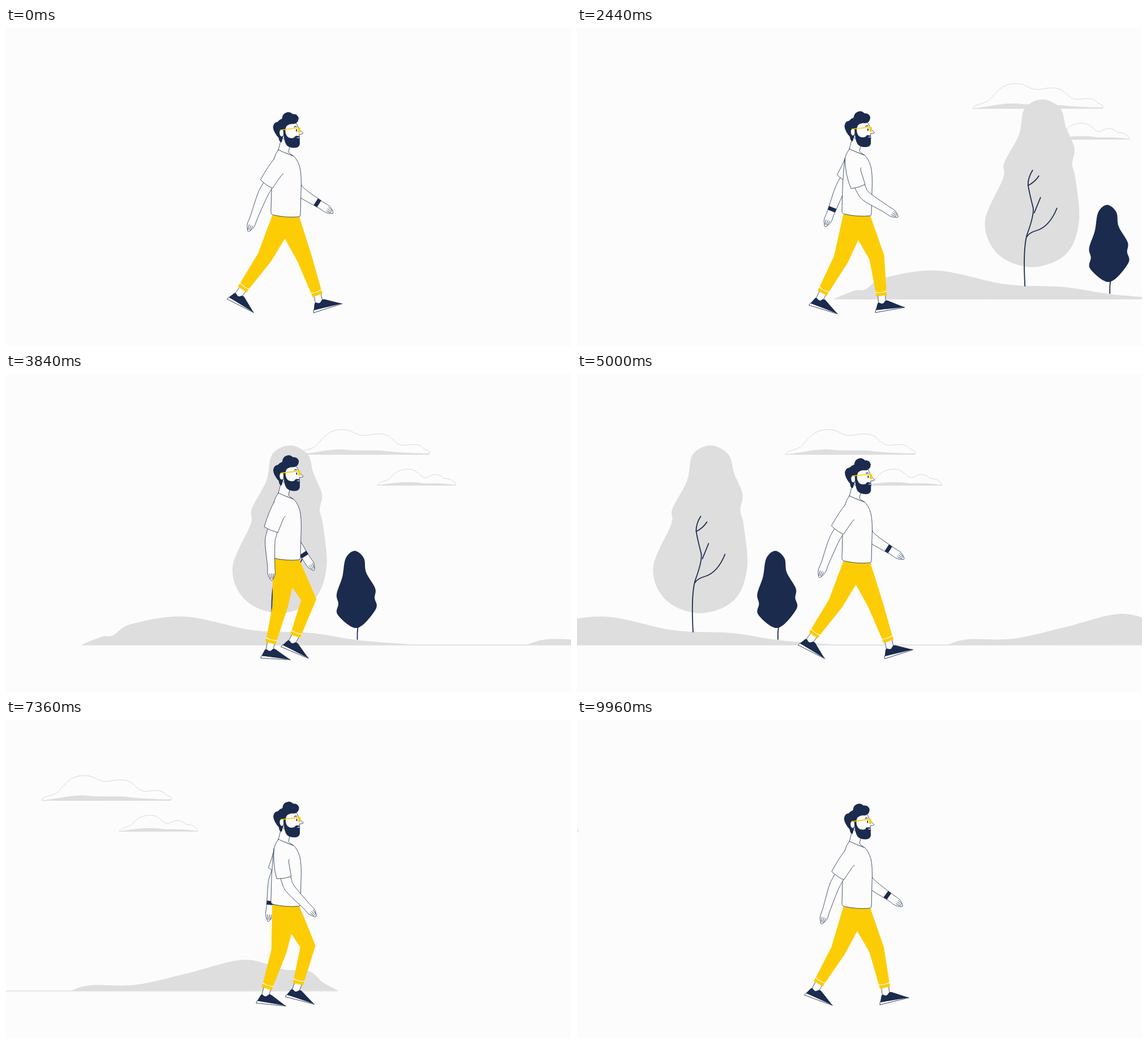
An HTML page with a canvas for the animation above (10 s loop, 998x561 px).

```html
<!DOCTYPE html>
<html lang="en">
<head>
<meta charset="utf-8">
<title>Walking man</title>
<style>
  html, body { margin: 0; width: 100%; height: 100%; overflow: hidden; background: #fcfcfc; }
  canvas { display: block; width: 998px; height: 561px; }
</style>
</head>
<body>
<canvas id="stage" width="998" height="561"></canvas>
<script>
const ctx = document.getElementById('stage').getContext('2d');
const PAPER = '#fcfcfc', NAVY = '#1b2b4d', YELLOW = '#fccc05', GRAY = '#dedede';
const LOOP = 10000, STEP = 40, STRIDE = 1000;
const TAU = Math.PI * 2, rad = d => d * Math.PI / 180;
const wave = u => Math.cos(TAU * u);

// ---- drawing helpers ----
// Cubic through b and c, with a and d as neighbours
const spline = (a, b, c, d, s) =>
  b + 0.5 * s * (c - a + s * (2 * a - 5 * b + 4 * c - d + s * (3 * (b - c) + d - a)));

function paint(path, fill, stroke, width = 0.8) {
  if (fill) { ctx.fillStyle = fill; ctx.fill(path); }
  if (stroke) { ctx.strokeStyle = stroke; ctx.lineWidth = width; ctx.stroke(path); }
}

function poly(...pts) {
  const p = new Path2D();
  pts.forEach(([x, y]) => p.lineTo(x, y));
  p.closePath();
  return p;
}

// Smooth path; a loop also rounds the joint between its ends
function curve(pts, loop = false) {
  const p = new Path2D(), n = pts.length;
  const at = i => loop ? pts[(i + n) % n] : pts[Math.max(0, Math.min(n - 1, i))];
  p.moveTo(...pts[0]);
  for (let i = 0; i < (loop ? n : n - 1); i++) {
    const [a, b, c, d] = [at(i - 1), at(i), at(i + 1), at(i + 2)];
    p.bezierCurveTo(b[0] + (c[0] - a[0]) / 6, b[1] + (c[1] - a[1]) / 6,
      c[0] - (d[0] - b[0]) / 6, c[1] - (d[1] - b[1]) / 6, c[0], c[1]);
  }
  return p;
}

const pairs = list => list.split(' ').map(s => s.split(',').map(Number));
const blob = list => curve(pairs(list), true);
const line = list => curve(pairs(list));
const shape = d => new Path2D(d);

// Frame along a bone: (distance down the bone, offset to its front side)
function bone(x, y, deg) {
  const s = Math.sin(rad(deg)), c = Math.cos(rad(deg));
  return (d, w = 0) => [x + d * s + w * c, y + d * c - w * s];
}

// ---- scenery ----
const hills = [
  line('-132,478 -122,473 -95,463 -77,461 -44,441 50,428 170,452 273,457 360,470 463,478'),
  line('653,478 690,468 770,467 860,447 960,423 1030,440 1075,443 1100,463 1126,477')
];
const bigTree = blob('236,126 267,142 277,175 292,212 288,240 294,267 300,342 277,399 217,422 157,399 134,342 166,265 168,238 194,188 204,142');
const smallTree = blob('350,312 366,325 370,350 386,378 385,395 387,415 354,448 320,425 321,405 318,388 328,358 334,325');
const branches = [
  'M204.500 455Q201 390 208 365Q221 330 219 317Q211 286 210 276Q210 264 218 251',
  'M210 278Q223 271 229 261',
  'M221 326L232 299',
  'M208 368Q212 361 226 357Q248 350 261 318'
].map(shape);
const smallTrunk = shape('M355.500 446Q354 456 354.500 468');

const clouds = [
  shape('M192 141.500C194 133 214 135 222 126C235 112 243 98 268 98C290 98 290 111 312 108C362 98 351 124 376 126C392 124 404 122 412 132Q426 137 421 141.500Z'),
  shape('M330 196C336 187 344 191 352 184C362 172 371 168 385 168C403 168 405 184 417 183C430 174 440 177 447 184Q463 184 469 195.500Z')
];
const cloudBases = [
  shape('M192 142C225 138 240 133 268 133C292 136 315 134 335 135C360 138 395 140 421 140V142Z'),
  shape('M330 196.500Q380 187 412 193Q450 192 469 196.500Z')
];

function scenery(t) {
  ctx.save();
  ctx.translate(0.1294 * (6360 - t), 0);
  cloudBases.forEach(c => paint(c, GRAY));
  clouds.forEach(c => paint(c, null, '#d9d9d9', 1));
  ctx.restore();

  ctx.save();
  ctx.translate(0.229 * (5002 - t), 0);
  paint(bigTree, GRAY);
  paint(shape('M-132 478H1126'), null, '#cfcfcf', 1);
  hills.forEach(h => paint(h, GRAY));
  branches.forEach(b => paint(b, null, NAVY, 1.8));
  paint(smallTree, NAVY);
  paint(smallTrunk, null, NAVY, 1.8);
  ctx.restore();
}

// ---- legs: angles at even steps of one stride, from heel strike ----
const gait = {
  thigh: [24.3, 14, 6, -3, -13, -27.5, -12, 12, 30, 26.5],
  shin: [19.5, 11, 3, -8, -24.5, -35, -48, -44, -30, -4],
  foot: [-17.7, -3, 0, 0, 11, 27, 45, 43, 36, 0]
};

function angle(keys, u) {
  const n = keys.length, i = Math.floor(u * n);
  const [a, b, c, d] = [-1, 0, 1, 2].map(k => keys[(i + k + n) % n]);
  return spline(a, b, c, d, u * n - i);
}

const sole = shape('M0 0L52.500 0L48 -2L1.500 -4.500Z');
const shoe = shape('M1.300 -4.300L6 -14.500Q8 -17.500 11 -15Q15 -11.500 18 -15Q21.500 -19.500 26 -16.500L52 -.3Z');

function leg(u, hipY) {
  const thigh = angle(gait.thigh, u), shin = angle(gait.shin, u), foot = angle(gait.foot, u);
  const knee = bone(494, hipY, thigh)(81.3);
  const joint = bone(...knee, (thigh + shin) / 2);
  const cuff = bone(...knee, shin)(68.7);
  const low = bone(...cuff, shin);
  const ankle = bone(...cuff, -foot);

  paint(poly(low(-4, -6), ankle(14, -8), ankle(14, 5), low(-4, 7)), PAPER, NAVY);
  ctx.save();
  ctx.translate(...ankle(27, -15.7));
  ctx.rotate(rad(foot));
  paint(sole, PAPER, NAVY);
  paint(shoe, NAVY);
  ctx.restore();

  paint(poly([470.5, hipY - 2], [517, hipY - 2], joint(0, 13), low(-8, 9),
    low(-0.6, 9), low(-0.6, -9), low(-8, -9), joint(0, -13)), YELLOW, YELLOW, 1);
  paint(curve([low(-7.5, -10), low(-6.2), low(-7.5, 10)]), null, PAPER, 1.2);
}

// ---- arms ----
function arm(x, y, a, b, top, watch) {
  const up = bone(x, y, a), fore = bone(...up(58), b), sleeve = bone(x, y, a - 4.5);
  paint(curve([
    up(36, -9), up(48, -9), fore(6, -8.7), fore(46, -6.6), fore(61, -6.6), fore(70, -3.2),
    fore(73.5, -0.5), fore(70, 3), fore(61, 6.6), fore(46, 6.6), fore(8, 8.5), up(48, 9), up(36, 9)
  ]), PAPER, NAVY);
  for (const w of [-2.6, 0.4, 3.2])
    paint(curve([fore(61.5, w * 1.2), fore(70, w * 0.75)]), null, NAVY);
  if (watch) paint(poly(fore(37, -7.2), fore(44, -7), fore(44, 7), fore(37, 7.2)), NAVY);

  const p = new Path2D(), front = sleeve(12, 12.5);
  p.moveTo(front[0] + 2, front[1] - 1);
  p.quadraticCurveTo(...front, ...sleeve(16, 12.6));
  p.lineTo(...sleeve(42, 13));
  p.quadraticCurveTo(...sleeve(44.5), ...sleeve(42, -13));
  p.quadraticCurveTo(...sleeve(14, -16), ...top);
  paint(p, PAPER, NAVY);
}

// ---- torso and head ----
const neck = shape('M488 188L481 216L508 226Q501 222 499 219L501.500 207');
const shirt = shape('M481 215Q475 223 473 232Q470 262 469 285L468 325Q468 329 473 330Q495 335 517 333Q520 333 520 329L521 290Q522.500 260 519 246Q515 232 508 226Q494 221 481 215Z');
const face = shape('M490 170L512 167Q516 172 518 179L525 185.500Q526 187 518 188L519 196L500 202L488 194Z');
const hair = shape('M486.500 202Q482 200 482 194Q473 184 472 175Q473 166 480 165.500Q484 161 488 160Q489 152 494 150Q501 146 507 152Q515 151 517.500 159Q517 168 509 169.500Q501 168.500 496 173Q494 176 493.500 182L489 194Q488 199 486.500 202Z');
const ear = shape('M490.500 181Q485 178 483.500 183Q483 190 487 191.500Q490 191 490.500 187Z');
const beard = shape('M490 181L493.500 180Q494 190 499 193Q505 196 510 193Q510.500 190 514 190.500L518.500 191L518 193L513 193.500L519 195L519 205Q518 211 511 211.500Q501 212 496 207Q491 201 490 181Z');
const glasses = shape('M485.500 180L517 176.300');
const lens = shape('M516.500 175.500L520 176.500L519.500 185L517 184Z');
const brow = shape('M509.500 175Q511.500 173 513.500 174.300');
const eye = shape('M513.500 179.500V182');

function head(t) {
  ctx.save();
  ctx.translate(493, 212);
  ctx.rotate(rad(0.5 + 1.1 * wave((t - 5000) * 3 / LOOP)));
  ctx.translate(-493, -212);
  paint(face, PAPER, NAVY);
  paint(hair, NAVY);
  paint(ear, PAPER);
  paint(beard, NAVY);
  paint(brow, null, NAVY, 1.2);
  paint(eye, null, NAVY, 1.8);
  paint(glasses, null, YELLOW, 1.6);
  paint(lens, YELLOW, YELLOW);
  ctx.restore();
}

function man(t) {
  const near = t % STRIDE / STRIDE, far = (near + 0.5) % 1;
  const bob = 6.5 * Math.pow(Math.sin(TAU * near) ** 2, 0.7);
  const upper = u => -4 - 27 * wave(u);
  const lower = u => -42 * wave(u - 0.02);

  arm(493.5, 233 - bob, upper(far), 15.5 + lower(far), [474, 230 - bob], true);
  leg(far, 333 - bob);
  leg(near, 333 - bob);

  ctx.save();
  ctx.translate(0, -bob);
  paint(neck, PAPER, NAVY);
  paint(shirt, PAPER, NAVY);
  head(t);
  ctx.restore();

  arm(484.5, 241 - bob, upper(near), 20.5 + lower(near), [473.5, 231 - bob], false);
}

function draw() {
  const t = Math.floor(performance.now() % LOOP / STEP) * STEP;
  ctx.fillStyle = PAPER;
  ctx.fillRect(0, 0, 998, 561);
  ctx.lineJoin = ctx.lineCap = 'round';
  scenery(t);
  man(t);
  requestAnimationFrame(draw);
}
draw();
</script>
</body>
</html>
```
